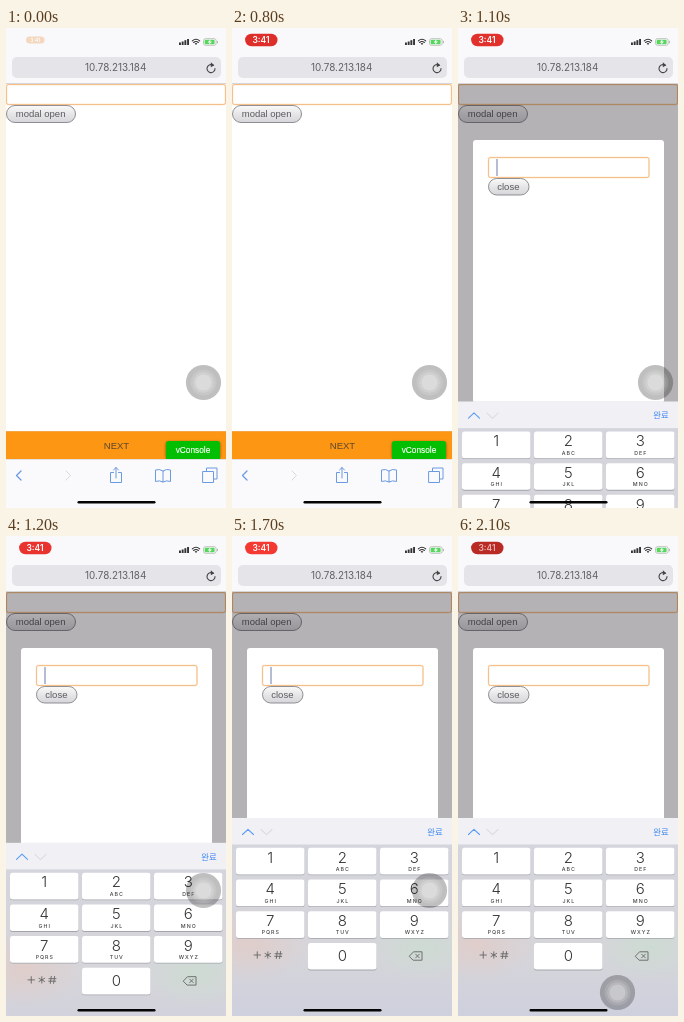
Animation of 220x480 px, one loop 2.2 s. Source, as an HTML page:

```html
<!DOCTYPE html>
<html lang="en">
<head>
<meta charset="utf-8">
<title>Modal with number pad</title>
<style>
  html, body { margin: 0; width: 100%; height: 100%; overflow: hidden; background: #fff; }
  svg { display: block; width: 220px; height: 480px; }
  text { text-anchor: middle; }
  .arial { font-family: "Liberation Sans", Arial, sans-serif; font-size: 9.5px; }
  .ui { font-family: Inter, Roboto, sans-serif; }
  .kr { font-family: "Noto Sans CJK KR", "Noto Sans CJK", sans-serif; font-size: 8.4px; }
  .line { fill: none; stroke-linecap: round; stroke-linejoin: round; }
</style>
</head>
<body>
<svg viewBox="0 0 220 480">
  <defs>
    <linearGradient id="btn" x2="0" y2="1">
      <stop offset="0" stop-color="#fafafa"/>
      <stop offset=".5" stop-color="#e6e6e8"/>
      <stop offset="1" stop-color="#d6d6da"/>
    </linearGradient>
    <linearGradient id="pad" x2="0" y2="1">
      <stop offset="0" stop-color="#d3d4dd"/>
      <stop offset=".68" stop-color="#d6d5da"/>
      <stop offset="1" stop-color="#ced0dd"/>
    </linearGradient>
    <radialGradient id="rose">
      <stop offset="0" stop-color="#dfcdca"/>
      <stop offset="1" stop-color="#dfcdca" stop-opacity="0"/>
    </radialGradient>
    <radialGradient id="mint">
      <stop offset="0" stop-color="#cddbd2"/>
      <stop offset="1" stop-color="#cddbd2" stop-opacity="0"/>
    </radialGradient>
    <filter id="blur" x="-30%" y="-60%" width="160%" height="220%"><feGaussianBlur stdDeviation="1.6"/></filter>
  </defs>

  <rect width="220" height="480" fill="#fff"/>

  <!-- page -->
  <g id="page"></g>
  <rect y="403" width="220" height="28" fill="#fd9713"/>
  <rect y="403" width="220" height="1" fill="#f3a748"/>
  <text class="arial" x="110.5" y="420.800" fill="#5b4630">NEXT</text>

  <!-- modal -->
  <g id="modal">
    <rect y="56" width="220" height="375" fill="#080008" fill-opacity=".3"/>
    <rect x="15" y="112" width="191" height="263" rx="3" fill="#fff"/>
    <g id="form"></g>
    <rect id="caret" x="38.5" y="131" width="1" height="17" fill="#6f7ba6"/>
  </g>

  <rect x="160" y="414" width="54" height="17" rx="2" fill="#000" opacity=".5" filter="url(#blur)"/>
  <path d="M160 431V415.500Q160 413 162.500 413H211.500Q214 413 214 415.500V431Z" fill="#04be02"/>
  <text class="arial" x="187" y="425" fill="#fff" stroke="#fff" stroke-width=".15" style="font-size:8.3px">vConsole</text>

  <!-- browser toolbar -->
  <rect y="431" width="220" height="49" fill="#faf9fb"/>
  <rect y="431" width="220" height=".6" fill="#d5d3d6"/>
  <g class="line" stroke="#6a9ae2" stroke-width="1">
    <path d="M15 443L10.500 447.500L15 452" stroke-width="1.3"/>
    <path d="M60 443L64.500 447.500L60 452" stroke="#d9d9dd"/>
    <path d="M107.500 444.500H104.500V454.500H115.500V444.500H112.500M110 450V439.500M107.500 442L110 439.500L112.500 442"/>
    <path d="M157 443Q153.500 440.500 149.500 442V453.500Q153.500 452 157 454Q160.500 452 164.500 453.500V442Q160.500 440.500 157 443V454"/>
    <path d="M197 443.500H207.500V454.500H197ZM200.500 443.500V440H211V451H207.500"/>
  </g>

  <!-- status and address bars -->
  <rect width="220" height="56" fill="#f9f8fb"/>
  <rect y="55.300" width="220" height=".7" fill="#c9c6ca"/>
  <rect x="6" y="29" width="209" height="21" rx="5" fill="#e5e4e8"/>
  <text class="ui" x="109.700" y="43.300" font-size="9.9" fill="#606065">10.78.213.184</text>
  <path class="line" d="M207.200 37.300A4 4 0 1 0 209 40.500" stroke="#444" stroke-width="1.100"/>
  <path d="M204.800 34.300L208.300 37.200L204.800 39.300Z" fill="#444"/>
  <g fill="#333">
    <rect x="173" y="14.500" width="1.900" height="2.500"/>
    <rect x="175.700" y="13.500" width="1.900" height="3.500"/>
    <rect x="178.400" y="12.200" width="1.900" height="4.800"/>
    <rect x="181.100" y="11" width="1.900" height="6"/>
    <path d="M188.700 15.500Q190 14.600 191.300 15.500L190 17Z"/>
  </g>
  <path class="line" d="M186.300 12.900Q190 9.700 193.700 12.900M187.600 14.500Q190 12.500 192.400 14.500" stroke="#333" stroke-width="1.100"/>
  <rect x="197.500" y="10.700" width="12.600" height="6.600" rx="2" fill="#fff" stroke="#a8aaa8" stroke-width=".7"/>
  <rect x="198.600" y="11.800" width="10" height="4.400" rx="1" fill="#56d65c"/>
  <path d="M204.700 11L201.700 14.400H203.600L202.900 17L206 13.500H204.100Z" fill="#fff"/>
  <rect x="210.900" y="12.700" width=".9" height="2.600" rx=".4" fill="#a8aaa8"/>
  <g id="pill">
    <rect x="-16.200" y="-6.200" width="32.400" height="12.400" rx="6.200"/>
    <text id="clock" class="ui" x="-.3" y="3" font-size="8.500" font-weight="600" fill="#fff">3:41</text>
  </g>

  <g id="keyboard">
    <rect y="282" width="220" height="198" fill="url(#pad)"/>
    <ellipse cx="18" cy="408" rx="60" ry="38" fill="url(#rose)"/>
    <ellipse cx="190" cy="412" rx="55" ry="34" fill="url(#mint)"/>
    <rect y="282" width="220" height="26.500" fill="#f0f0f5"/>
    <g class="line" stroke-width="1.100">
      <path d="M10.500 298.500L16 293.300L21.500 298.500" stroke="#5c9cf4"/>
      <path d="M29 293.500L34.500 298.700L40 293.500" stroke="#dcdce1"/>
    </g>
    <text class="kr" x="203" y="298.800" fill="#3f87f2">완료</text>
    <g id="keys"></g>
    <g class="line" stroke="#666" stroke-width=".9">
      <path d="M22 419H28.500M25.250 415.750V422.250"/>
      <path d="M35.800 415.800V422.200M33 417.400L38.600 420.600M38.600 417.400L33 420.600"/>
      <path d="M45.300 415.500L44.300 422.500M48.600 415.500L47.600 422.500M43 417.800H50M42.700 420.300H49.700"/>
      <path d="M177.500 420L181.500 415.800H190V424.200H181.500ZM183.700 418.200L187.300 421.800M187.300 418.200L183.700 421.800"/>
    </g>
  </g>

  <rect x="71.500" y="472.900" width="78" height="2.500" rx="1.250" fill="#050505"/>

  <g id="ball">
    <circle r="17.600" fill="#000" fill-opacity=".25"/>
    <circle r="13" fill="#fff" fill-opacity=".13"/>
    <circle r="10.500" fill="#fff" fill-opacity=".16"/>
    <circle r="8" fill="#fff" fill-opacity=".24"/>
  </g>
</svg>

<script>
const LOOP = 2200, STEP = 100, OPEN = 1000;
const $ = id => document.getElementById(id);

const field = (x, y, w, h) => `
  <rect x="${x + .5}" y="${y + .5}" width="${w - 1}" height="${h - 1}" rx="2" fill="#fff" stroke="#fdebd8" stroke-width="1.800"/>
  <rect x="${x + .5}" y="${y + .5}" width="${w - 1}" height="${h - 1}" rx="2" fill="none" stroke="#f4b478" stroke-width=".8"/>`;

const button = (x, y, w, h, label) => `
  <rect x="${x + .5}" y="${y + .5}" width="${w - 1}" height="${h - 1}" rx="${h / 2 - .5}" fill="url(#btn)" stroke="#848488" stroke-width=".9"/>
  <text class="arial" x="${x + w / 2 - .4}" y="${y + h / 2 + 3.4}" fill="#5a5a5f">${label}</text>`;

$("page").innerHTML = field(0, 56, 220, 21) + button(0, 77, 70, 18, "modal open");
$("form").innerHTML = field(30, 129, 161.5, 21) + button(30, 150, 41.5, 17.5, "close");

function key(digit, letters, col, row) {
  const x = 4 + col * 72, y = 311.8 + row * 31.7, mid = x + 34.3;
  return `
    <rect x="${x}" y="${y + .8}" width="68.500" height="26.700" rx="2.500" fill="#a4a5ac"/>
    <rect x="${x}" y="${y}" width="68.500" height="26.700" rx="2.500" fill="#fff"/>
    <text class="ui" x="${mid}" y="${y + (row === 3 ? 18.5 : 14.8)}" font-size="15" font-weight="300" fill="#333">${digit}</text>
    <text class="ui" x="${mid + .5}" y="${y + 23.2}" font-size="5.300" font-weight="500" letter-spacing="1" fill="#444">${letters}</text>`;
}
const letters = ["", "ABC", "DEF", "GHI", "JKL", "MNO", "PQRS", "TUV", "WXYZ"];
$("keys").innerHTML =
  letters.map((s, i) => key(i + 1, s, i % 3, Math.floor(i / 3))).join("") + key(0, "", 1, 3);

// Rows are [time, ...values]; values between rows are linear.
function at(rows, t) {
  const i = rows.findIndex(r => r[0] > t);
  if (i < 0) return rows[rows.length - 1].slice(1);
  if (i === 0) return rows[0].slice(1);
  const a = rows[i - 1], b = rows[i], k = (t - a[0]) / (b[0] - a[0]);
  return a.slice(1).map((v, n) => v + (b[n + 1] - v) * k);
}

const pillColor = [
  [0, 243, 215, 190], [100, 240, 130, 105], [200, 236, 60, 50], [400, 236, 50, 43],
  [800, 222, 46, 42], [1100, 226, 48, 44], [1400, 245, 56, 52],
  [1700, 244, 56, 50], [2100, 186, 42, 36]
];
const pillScale = [[0, .57], [200, .95], [300, 1]];
const clockAlpha = [[1700, 1], [2100, .65]];
const ballPath = [[0, 197.5, 354.5], [1800, 197.5, 354.5], [1900, 192, 374], [2000, 175, 425], [2100, 159.5, 456.5]];

function draw(t) {
  const open = t >= OPEN;
  $("modal").style.display = $("keyboard").style.display = open ? "" : "none";
  $("caret").style.display = t < 1900 ? "" : "none";

  // Critically damped slide
  const w = Math.max(0, t - OPEN) * .018;
  const drop = 198 * (1 + w) * Math.exp(-w);
  $("keyboard").setAttribute("transform", `translate(0 ${drop})`);

  $("pill").setAttribute("transform", `translate(29.300 12) scale(${at(pillScale, t)[0]})`);
  $("pill").setAttribute("fill", `rgb(${at(pillColor, t).map(Math.round)})`);
  $("clock").setAttribute("fill-opacity", at(clockAlpha, t)[0]);
  $("ball").setAttribute("transform", `translate(${at(ballPath, t)})`);
}

function tick() {
  draw(Math.floor(performance.now() % LOOP / STEP) * STEP);
  requestAnimationFrame(tick);
}
tick();
</script>
</body>
</html>
```
